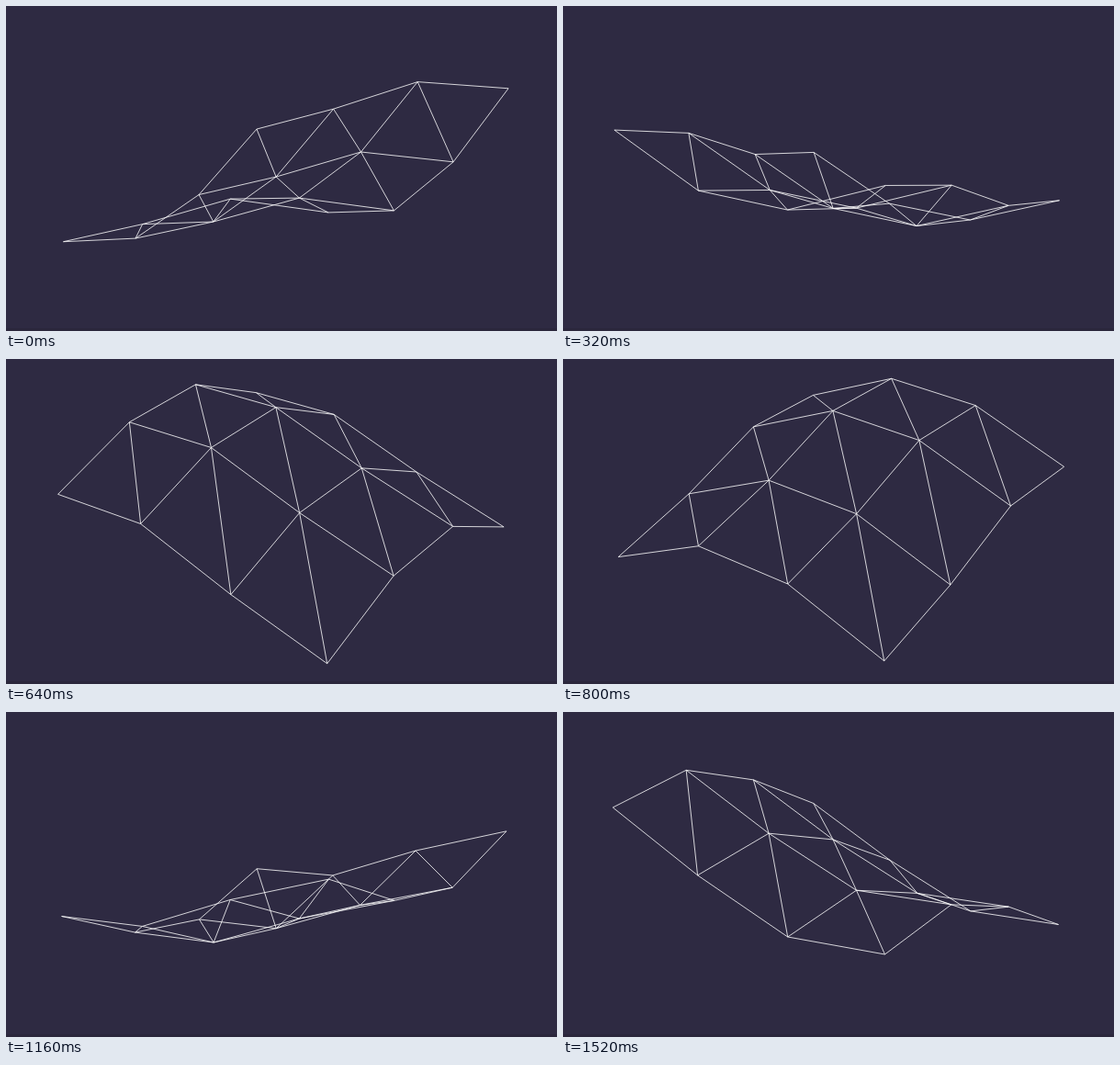
An HTML page with a canvas that plays this animation: 600x354 px, repeating every 1.56 s.

```html
<!DOCTYPE html>
<html>
<head>
<meta charset="utf-8">
<style>
  html, body { margin: 0; width: 600px; height: 354px; overflow: hidden; background: #2e2a42; }
  canvas { display: block; }
</style>
</head>
<body>
<canvas id="stage" width="600" height="354"></canvas>
<script>
const ctx = document.getElementById('stage').getContext('2d');
const LOOP = 1560, STEP = 40, SIZE = 4;

// Perspective projection of a grid point lifted by two crossing waves.
function project(col, row, phase) {
  const drop = 49.7 * (Math.cos(phase - 0.457 - col) + Math.cos(phase - 1.877 + row));
  const w = 1 - 0.0351 * col - 0.0476 * row + drop / 4700;
  const x = 272.3 + 71.16 * col - 74.19 * row + drop * 300 / 4700;
  const y = 105.3 + 12.02 * col + 17.42 * row + drop;
  return [x / w + 0.5, y / w];
}

function draw(time) {
  const tick = Math.floor((time % LOOP) / STEP);
  const phase = Math.round(tick * 2.4 + 0.2) / 10;

  ctx.fillStyle = '#2e2a42';
  ctx.fillRect(0, 0, 600, 354);
  ctx.fillStyle = '#2a263b';
  ctx.fillRect(0, 351, 600, 3);

  ctx.strokeStyle = 'rgba(255, 255, 255, 0.8)';
  ctx.lineWidth = 1;
  ctx.beginPath();
  for (let row = 0; row < SIZE; row++) {
    for (let col = 0; col < SIZE; col++) {
      for (const [dc, dr] of [[1, 0], [0, 1], [1, 1]]) {
        if (col + dc >= SIZE || row + dr >= SIZE) continue;
        ctx.moveTo(...project(col, row, phase));
        ctx.lineTo(...project(col + dc, row + dr, phase));
      }
    }
  }
  ctx.stroke();
}

const start = performance.now();
function loop() {
  draw(performance.now() - start);
  requestAnimationFrame(loop);
}
loop();
</script>
</body>
</html>
```
